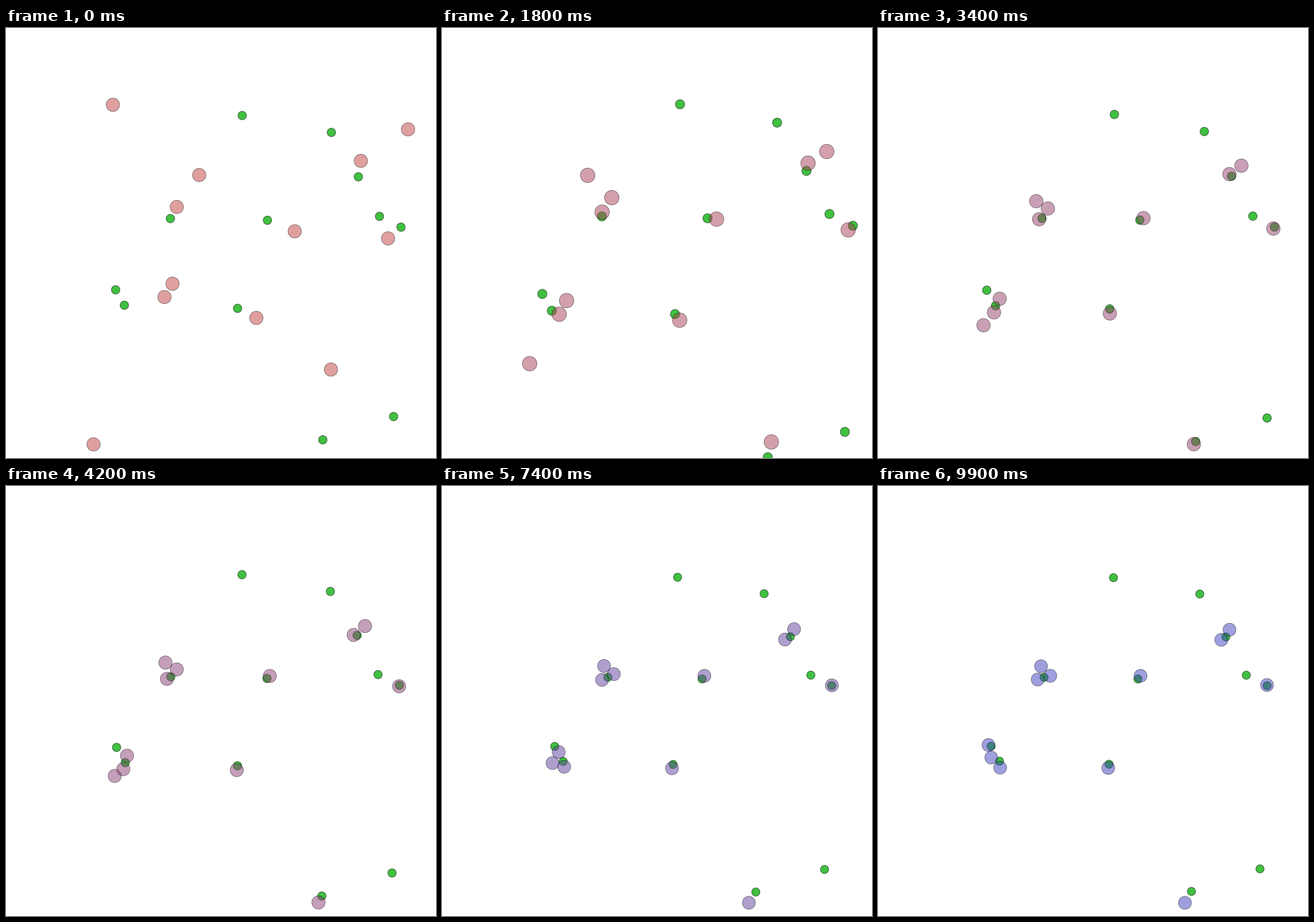
Recreate the animation shown at these times as a matplotlib script. Size 700x700 px, loop 10 s.

```python
import numpy as np
import matplotlib.pyplot as plt
from matplotlib.animation import FuncAnimation
from matplotlib.patches import Circle

SIZE, FRAMES, STEP = 700, 100, 100
MID = SIZE / 2
MARGIN, MIN_REACH = 22.2, 299.4   # camera padding and closest framing
R_TARGET, R_AGENT = 6.9, 10.9
WARM, COOL = np.array([192, 64, 64]) / 255, np.array([64, 64, 192]) / 255
GREEN = np.array([64, 192, 64]) / 255
EDGE = (0, 0, 0, 0.5)

# World coordinates, relative to the middle of the stage.
targets = np.array([
    (34.5, -207.5), (179.7, -180), (223.6, -107.8), (258, -43.4),
    (293, -25.8), (75.6, -37), (-82.4, -39.8), (-171.5, 76.2),
    (-157.3, 101.3), (27, 106.4), (281, 282.5), (165.7, 320.4)])

# Waypoints of each agent; calm paths need fewer of them.
TIMES = {7: [0, 10, 26, 42, 57, 74, 99],
         6: [0, 10, 26, 42, 57, 99],
         5: [0, 10, 26, 42, 99]}
paths = [
    [(-207.5, 327.8), (-200.3, 231.5), (-182.5, 148.9), (-174.6, 123.1),
     (-178.3, 112.2), (-175.3, 104.1), (-171.2, 95.2)],
    [(-79, 66.3), (-118.5, 80.4), (-145, 88.9), (-154.4, 89.8),
     (-159.3, 87.6), (-164.9, 85.6), (-175.9, 74)],
    [(-92, 88), (-130.5, 100.4), (-154.7, 110), (-160.4, 112),
     (-153.2, 108.6), (-155.7, 110.3), (-156.2, 112.2)],
    [(-176, -225), (-124.9, -142.9), (-93.7, -77.3), (-91.3, -63.1),
     (-90.2, -59.9), (-87.4, -58.5)],
    [(-35.5, -110.7), (-58.3, -78.4), (-72, -61.5), (-72.7, -51.8),
     (-72.7, -48.2), (-71.9, -42.4)],
    [(-72, -58.7), (-79, -51.7), (-84.5, -41.8), (-88.8, -36.3),
     (-93.1, -36.2)],
    [(304.5, -185), (270.7, -152), (244, -128.4), (236.6, -123.1),
     (231.6, -121.4), (229.7, -120)],
    [(227.7, -133.7), (227.2, -124.5), (223.8, -115.3), (218, -108.5),
     (217.7, -106.6), (214.7, -103.1), (215.9, -102.9)],
    [(120, -19), (98, -31), (84.2, -38.4), (80.2, -41.1), (80, -42.4)],
    [(272, -7.5), (282, -15.6), (288.7, -22.1), (292.6, -24.2),
     (292.8, -26.9)],
    [(57.5, 122), (41.1, 117.6), (29.8, 114.3), (25.9, 113.5),
     (25.6, 112.8)],
    [(179, 206), (175.9, 269.5), (166.5, 314.4), (160.1, 331),
     (157.8, 336), (154.1, 338.4), (154.7, 339.6)],
]


def settle(t):
    """Warped time in which the slowing agents move almost evenly."""
    return 1 - np.exp(-0.03 * np.asarray(t, float))


def trace(points):
    """Cubic Hermite curve through the waypoints, one row per frame."""
    p = np.array(points, float)
    u = settle(TIMES[len(p)])
    m = np.gradient(p, u, axis=0, edge_order=2)
    x = settle(np.arange(FRAMES))
    i = np.clip(np.searchsorted(u, x, side="right") - 1, 0, len(u) - 2)
    h = (u[i + 1] - u[i])[:, None]
    s = (x - u[i])[:, None] / h
    return ((1 + 2 * s) * (1 - s) ** 2 * p[i] + s * (1 - s) ** 2 * h * m[i]
            + s * s * (3 - 2 * s) * p[i + 1] - s * s * (1 - s) * h * m[i + 1])


agents = np.stack([trace(p) for p in paths], axis=1)
reach = np.abs(agents).max(axis=(1, 2))
zoom = MID / (np.maximum(reach, MIN_REACH) + MARGIN)

fig = plt.figure(figsize=(7, 7), dpi=100, facecolor="white")
ax = fig.add_axes([0, 0, 1, 1])
ax.set(xlim=(0, SIZE), ylim=(SIZE, 0))
ax.axis("off")


def make_dots(count, width, z):
    return [ax.add_patch(Circle((0, 0), 1, fc=GREEN, ec=EDGE, lw=width, zorder=z))
            for _ in range(count)]


target_dots = make_dots(len(targets), 0.8, 1)
agent_dots = make_dots(len(paths), 0.6, 2)


def place(dots, points, radius, scale):
    for dot, p in zip(dots, points):
        dot.center = MID + scale * p
        dot.radius = radius * scale


def update(n):
    place(target_dots, targets, R_TARGET, zoom[n])
    place(agent_dots, agents[n], R_AGENT, zoom[n])
    color = WARM + (COOL - WARM) * n / FRAMES
    for dot in agent_dots:
        dot.set_facecolor((*color, 0.5))
    return target_dots + agent_dots


anim = FuncAnimation(fig, update, frames=FRAMES, interval=STEP,
                     repeat=True, repeat_delay=0)
plt.show()
```
